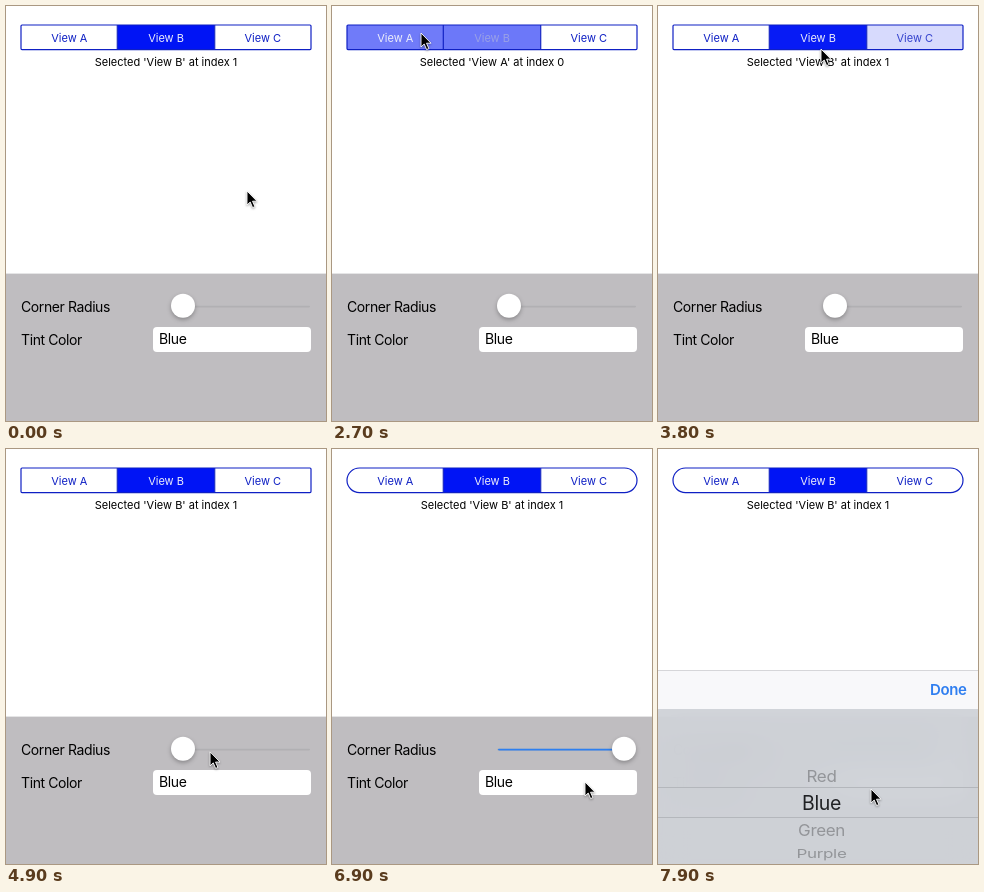
These frames come from a looping animation (320x415 px, 8000 ms). An HTML page:

```html
<!DOCTYPE html>
<html lang="en">
<head>
<meta charset="utf-8">
<title>Segmented control</title>
<style>
  html, body { margin: 0; width: 100%; height: 100%; overflow: hidden; background: #fff; }
  #stage { position: relative; width: 320px; height: 415px; overflow: hidden; }
  svg { position: absolute; left: 0; top: 0; display: block; }
  text { font-family: Inter, Roboto, sans-serif; }
  .small { font-size: 11px; text-anchor: middle; }
  .form { font-size: 14px; letter-spacing: -.4px; }
  .row { font-size: 17px; letter-spacing: -.35px; text-anchor: middle; fill: #939599; }
  .pick { font-size: 19.5px; letter-spacing: -.4px; text-anchor: middle; fill: #202124; }
  .done { font-size: 15px; font-weight: 600; letter-spacing: -.4px; fill: #2f7ef0; }
  #sheet { position: absolute; left: 0; top: 0; width: 320px; height: 260px; }
  #bar, #wheel { position: absolute; left: 0; width: 320px; backdrop-filter: blur(14px); }
  #bar { top: 0; height: 39px; background: rgba(247, 247, 249, .8); }
  #wheel { top: 39px; height: 221px; background: rgba(207, 210, 216, .93); }
  #knob { filter: drop-shadow(0 2px 2px rgba(0, 0, 0, .28)); }
  #cursor { filter: drop-shadow(0 1px 1px rgba(0, 0, 0, .35)); }
</style>
</head>
<body>
<div id="stage">
  <svg width="320" height="415">
    <clipPath id="clip"><rect class="pill" x="15" y="19" width="290" height="25"/></clipPath>
    <g id="segments" clip-path="url(#clip)"></g>
    <g fill="none" stroke="#0f20c4" stroke-width="1.2">
      <path d="M111.3 19v25M208.7 19v25"/>
      <rect class="pill" x="15" y="19" width="290" height="24.6"/>
    </g>
    <text id="label" class="small" x="160" y="60"></text>

    <rect y="267.6" width="320" height="148" fill="#bfbdc0"/>
    <text class="form" x="15" y="305.5">Corner Radius</text>
    <text class="form" x="15" y="338.5">Tint Color</text>
    <rect x="147" y="321" width="158" height="25" rx="4" fill="#fff"/>
    <text class="form" x="153" y="338.4">Blue</text>
    <rect x="165" y="299.8" width="139" height="1.6" rx=".8" fill="#b1b0b3"/>
    <rect id="track" x="166" y="299.8" height="1.6" rx=".8" fill="#2d7ff0"/>
    <circle id="knob" cy="299.8" r="12" fill="#fff"/>
  </svg>

  <div id="sheet">
    <div id="bar"></div>
    <div id="wheel"></div>
    <svg width="320" height="260">
      <path d="M0 .5h320" stroke="#d6d6d9"/>
      <path d="M0 117.5h320M0 147.5h320" stroke="#b4b7bc"/>
      <text class="done" x="272" y="25.3">Done</text>
      <text class="row" transform="translate(163.5 111.7) scale(1 .95)">Red</text>
      <text class="pick" x="163.5" y="140">Blue</text>
      <text class="row" transform="translate(163.5 165.7) scale(1 .95)">Green</text>
      <text class="row" transform="translate(163.5 187.5) scale(1 .72)">Purple</text>
    </svg>
  </div>

  <svg width="320" height="415">
    <path id="cursor" d="M0 0v14l3.2-3 2.4 5.6 2.3-1-2.4-5.4h4.5z" stroke="#fff" stroke-width=".9"/>
  </svg>
</div>
<script>
const LOOP = 8000, STEP = 100, FADE = 400;
const BLUE = [0, 20, 245], INK = [15, 32, 196], WHITE = [255, 255, 255];
const DRAG = { start: 4600, end: 6000, lag: 300, grip: 14, min: 177, max: 292 };
const SHEET = { start: 7500, top: 220, rise: 45 };

// Pointer moves: start, end, x, y
const home = [241, 185];
const moves = [
  [0, 900, 87, 105.5], [1300, 2100, 89, 27],
  [2800, 3100, 257, 31], [3300, 3600, 163, 32], [3600, 3800, 163, 43],
  [3800, 4000, 178, 184], [4000, 4500, 191, 304],
  [4600, 5900, 247.5, 299], [5900, 6000, 308, 299], [6000, 6300, 335, 299],
  [6690, 6700, 268, 333], [6700, 6900, 253, 333], [7500, 7900, 213, 340]
];
const picks = [
  { time: -FADE, index: 1 }, { time: 2520, index: 0 },
  { time: 3150, index: 2 }, { time: 3500, index: 1 }
];

const $ = id => document.getElementById(id);
const clamp = (v, lo, hi) => Math.min(hi, Math.max(lo, v));
const mix = (a, b, k) => a + (b - a) * k;
const color = (a, b, k) => `rgb(${a.map((v, i) => Math.round(mix(v, b[i], k)))})`;
const smooth = v => {
  const k = clamp(v, 0, 1);
  return k * k * (3 - 2 * k);
};

function pointer(t) {
  let [x, y] = home;
  for (const [start, end, toX, toY] of moves) {
    const k = clamp((t - start) / (end - start), 0, 1);
    x = mix(x, toX, k);
    y = mix(y, toY, k);
  }
  return [x, y];
}

// The knob trails the pointer while it is dragged.
function knobAt(t) {
  const [x] = pointer(clamp(t - DRAG.lag, DRAG.start, DRAG.end));
  return clamp(x - DRAG.grip, DRAG.min, DRAG.max);
}

function sheetAt(t) {
  return t < SHEET.start ? 415 : SHEET.top + SHEET.rise * Math.exp((SHEET.start - t) / 100);
}

function add(parent, tag, attrs) {
  const el = document.createElementNS('http://www.w3.org/2000/svg', tag);
  for (const name in attrs) el.setAttribute(name, attrs[name]);
  return parent.appendChild(el);
}

const segments = ['View A', 'View B', 'View C'].map((name, i) => {
  const x = 15 + i * 96.7, width = 96.7;
  const box = add($('segments'), 'rect', { x, y: 19, width, height: 25 });
  const text = add($('segments'), 'text', { class: 'small', x: x + width / 2, y: 35.5 });
  text.textContent = name;
  return { name, box, text };
});
const pills = document.querySelectorAll('.pill');

function drawSegments(t) {
  const n = picks.filter(p => p.time <= t).length - 1;
  const now = picks[n], old = picks[n - 1];
  const k = (t - now.time) / FADE;
  segments.forEach((s, i) => {
    const on = i === now.index;
    const fill = on ? smooth(k * 1.2) : old && i === old.index ? 1 - smooth(k) : 0;
    s.box.setAttribute('fill', color(WHITE, BLUE, fill));
    s.text.setAttribute('fill', color(INK, WHITE, on ? .92 : fill));
  });
  $('label').textContent = `Selected '${segments[now.index].name}' at index ${now.index}`;
}

function draw(t) {
  drawSegments(t);

  const knob = knobAt(t);
  const value = (knob - DRAG.min) / (DRAG.max - DRAG.min);
  $('knob').setAttribute('cx', knob);
  $('track').setAttribute('width', knob - 166);
  pills.forEach(p => p.setAttribute('rx', 1 + 11.5 * value));

  $('sheet').style.top = sheetAt(t) + 'px';
  $('cursor').setAttribute('transform', `translate(${pointer(t)})`);
}

const start = performance.now();
function tick() {
  const t = (performance.now() - start) % LOOP;
  draw(Math.floor(t / STEP) * STEP);
  requestAnimationFrame(tick);
}
tick();
</script>
</body>
</html>
```
